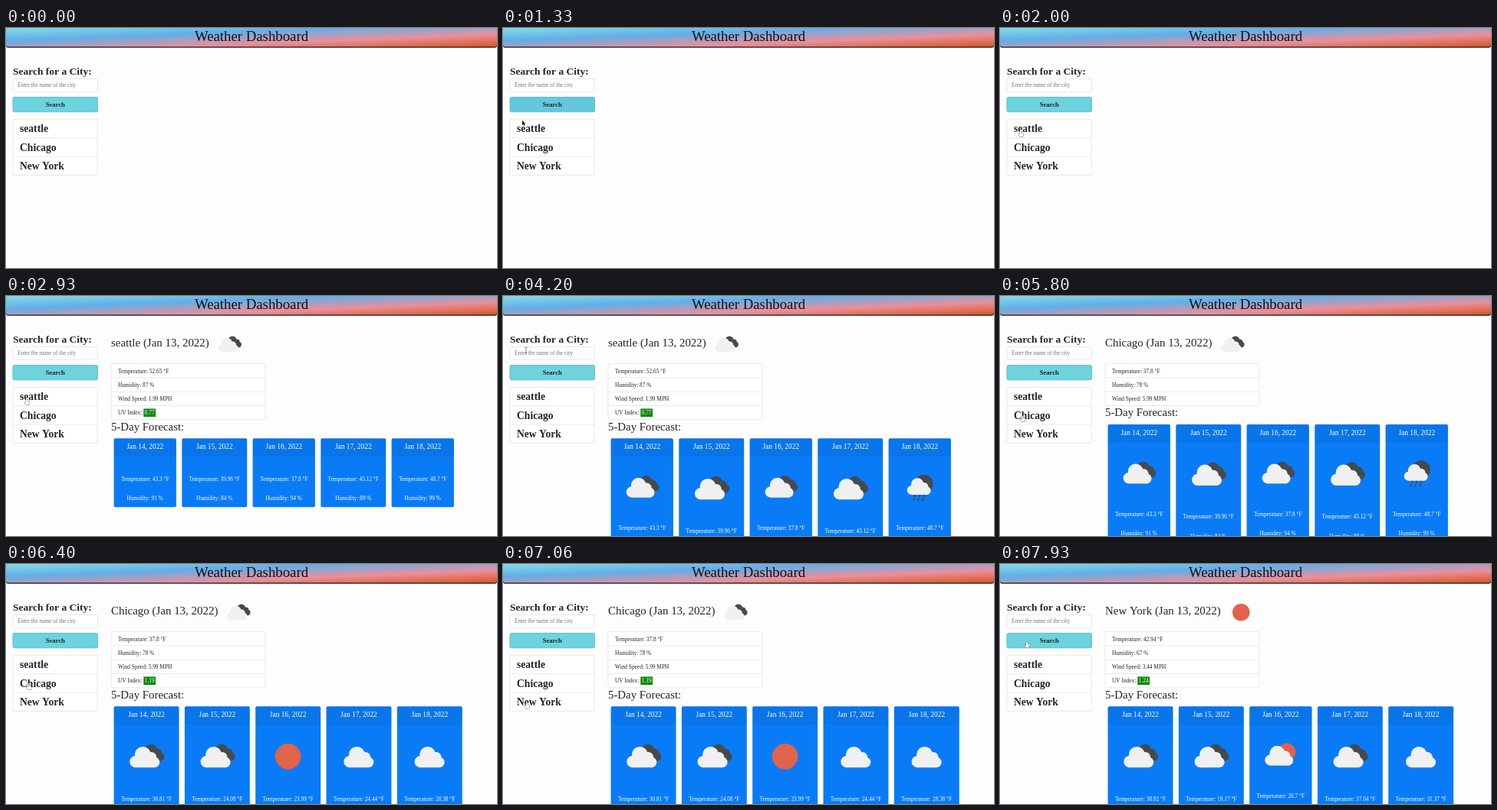
Write an HTML page with a canvas that moves like this. It is 640x314 px and loops after 8000 ms.

```html
<!DOCTYPE html>
<html lang="en">
<head>
<meta charset="utf-8">
<title>Weather Dashboard</title>
<style>
  html, body { margin: 0; width: 100%; height: 100%; overflow: hidden; background: #fdfdfd; }
  canvas { display: block; }
</style>
</head>
<body>
<canvas id="stage" width="640" height="314"></canvas>
<script>
const ctx = document.getElementById('stage').getContext('2d');
const LOOP = 8000, INK = '#212529', LINE = '#e4e4e4';

// info, uv, cards and icons are the times at which each part arrives
const cities = [
  { name: 'seattle', info: 2730, uv: 2800, cards: 2930, icons: 3000, icon: 'clouds',
    now: ['52.65', '87', '1.99', '0.77'], temps: ['43.3', '39.96', '37.8', '45.12', '48.7'],
    humidity: [91, 84, 94, 89, 99], sky: ['clouds', 'clouds', 'clouds', 'clouds', 'rain'] },
  { name: 'Chicago', info: 5800, uv: 5860, cards: 5860, icons: 5930, icon: 'clouds',
    now: ['37.8', '78', '5.99', '1.19'], temps: ['30.81', '24.08', '23.99', '24.44', '28.38'],
    humidity: [88, 81, 62, 75, 80], sky: ['clouds', 'clouds', 'sun', 'cloud', 'cloud'] },
  { name: 'New York', info: 7400, uv: 7460, cards: 7460, icons: 7530, icon: 'sun',
    now: ['42.94', '67', '3.44', '1.24'], temps: ['38.82', '19.17', '20.7', '37.04', '31.37'],
    humidity: [72, 45, 41, 78, 60], sky: ['clouds', 'clouds', 'sunCloud', 'clouds', 'cloud'] },
];

// pointer stops: time, x, y
const stops = [
  [460, -8, 140], [860, 22, 112], [1000, 22, 112], [1330, 25, 121], [1600, 27, 134.5],
  [3530, 27, 134.5], [4060, 30, 71], [4200, 30, 71], [5000, 29.5, 156.5], [6400, 29.5, 156.5],
  [6860, 31, 181], [7400, 31, 181], [7930, 35, 101.5],
];
const arrow = new Path2D('M0 0V6.2L1.5 4.9L2.5 7L3.6 6.5L2.7 4.5H4.5Z');
const hand = new Path2D('M-.9 4.5V.7Q0-.5.9.7V2.9L3.2 3.6Q3.7 4.5 3.4 5.8L2.6 8H-.9L-2.8 5.1Q-2.7 4.1-1.9 4.4Z');
const beam = new Path2D('M-1.5-4Q0-4 0-3Q0-4 1.5-4M0-3V3M-1.5 4Q0 4 0 3Q0 4 1.5 4');

const clamp = v => Math.min(1, Math.max(0, v));
const mix = (a, b, k) => a + (b - a) * k;
const latest = (part, t) => cities.findLast(c => t >= c[part]);

function text(str, x, y, size, { color = INK, weight = 'normal', align = 'left' } = {}) {
  ctx.font = `${weight} ${size}px "Liberation Serif", serif`;
  ctx.textAlign = align;
  ctx.fillStyle = color;
  ctx.fillText(str, x, y);
}

function box(x, y, w, h, fill, stroke, radius = 2) {
  ctx.beginPath();
  ctx.roundRect(x, y, w, h, radius);
  if (fill) { ctx.fillStyle = fill; ctx.fill(); }
  if (stroke) { ctx.strokeStyle = stroke; ctx.lineWidth = 0.8; ctx.stroke(); }
}

function rule(x, y, w, color = LINE) {
  ctx.fillStyle = color;
  ctx.fillRect(x, y - 0.4, w, 0.8);
}

function disc(x, y, r, color) {
  ctx.beginPath();
  ctx.arc(x, y, r, 0, 7);
  ctx.fillStyle = color;
  ctx.fill();
}

function cloud(x, y, scale, color) {
  ctx.save();
  ctx.translate(x, y);
  ctx.scale(scale, scale);
  disc(-11.5, 6, 7.2, color);
  disc(-2.5, -2.8, 10, color);
  disc(8, 0.5, 6.5, color);
  disc(11.8, 6.6, 6.6, color);
  ctx.fillRect(-11.5, 2, 23.3, 11.2);
  ctx.restore();
}

function rainDrops() {
  ctx.strokeStyle = DARK;
  ctx.lineWidth = 2;
  ctx.lineCap = 'round';
  ctx.beginPath();
  for (let i = 0; i < 6; i++) {
    const x = -6 + (i % 3) * 6 - (i > 2) * 1.5, y = 11 + (i > 2) * 4.5;
    ctx.moveTo(x, y);
    ctx.lineTo(x - 0.7, y + 1.4);
  }
  ctx.stroke();
}

const PALE = '#f0f0f0', DARK = '#48494b', SUN = '#e2634c';
const skies = {
  clouds() { cloud(7.5, -5, 0.8, DARK); cloud(-2, 0.5, 1, PALE); },
  cloud() { cloud(0, 0.5, 1, PALE); },
  sun() { disc(0, 0, 16, SUN); },
  sunCloud() { disc(8, -4, 11.5, SUN); cloud(-2, 0.5, 1, PALE); },
  rain() { disc(5.5, -4.5, 12, DARK); cloud(-1, -1, 0.84, PALE); rainDrops(); },
};

function drawIcon(kind, x, y, size) {
  ctx.save();
  ctx.translate(x, y);
  ctx.scale(size / 64, size / 64);
  skies[kind]();
  ctx.restore();
}

function drawHeader() {
  const sky = ctx.createLinearGradient(0, 0, 1.95, 49.9);
  ['#86dbe6', '#62aee8', '#ea8f9b', '#d9541e'].forEach((c, i) => sky.addColorStop(i / 3, c));
  box(0, 0, 640, 25.7, '#17131a', null, 3);
  box(0, 0, 640, 24.4, sky, null, 3);
  text('Weather Dashboard', 320, 17, 18.8, { color: '#111', align: 'center' });
}

function drawSidebar(t) {
  const bold = { weight: 'bold' };
  text('Search for a City:', 9, 60.5, 13.5, bold);
  box(9, 66.5, 110.5, 16.7, '#fff', '#dfe2e6');
  text('Enter the name of the city', 15, 77, 7.35, { color: '#6c757d' });
  const dim = t < 60 ? 0 : 1 - clamp((t - 1860) / 140);
  box(9, 90.5, 110.5, 19.3, `rgb(${mix(109, 100, dim)},${mix(211, 200, dim)},${mix(221, 218, dim)})`, '#52b2d4');
  text('Search', 64.3, 103, 8.6, { weight: 'bold', align: 'center' });
  box(9, 119.4, 110.2, 73, '#fff', LINE, 1);
  cities.forEach((c, i) => {
    if (i) rule(9, 119.4 + i * 24.4, 110);
    text(c.name, 18, 136 + i * 24.5, 13.6, bold);
  });
}

function drawCurrent(city, showUv) {
  const title = `${city.name} (Jan 13, 2022)`;
  text(title, 137, 66, 14.95);
  drawIcon(city.icon, 137 + ctx.measureText(title).width + 26.5, 63.3, 45);
  const [temp, humidity, wind, uv] = city.now;
  const rows = [`Temperature: ${temp} °F`, `Humidity: ${humidity} %`, `Wind Speed: ${wind} MPH`];
  if (showUv) rows.push('UV Index:');
  box(137, 88.6, 201, rows.length * 18.3, '#fff', LINE);
  rows.forEach((row, i) => {
    if (i) rule(137, 88.6 + i * 18.3, 201);
    text(row, 146, 100.5 + i * 18.2, 7.35);
  });
  if (showUv) {
    box(179.3, 147.4, 15.8, 10.8, '#0c8a0c', null, 0);
    text(uv, 187.2, 155.2, 7.35, { color: '#fff', align: 'center' });
  }
}

function drawForecast(city, top, showIcons) {
  const white = { color: '#fff', align: 'center' };
  text('5-Day Forecast:', 137, top - 10.5, 14.85);
  let x = 140.4;
  city.temps.forEach((temp, i) => {
    const w = temp.length > 4 ? 85.3 : 81.7, mid = x + w / 2;
    const size = w - 18, shift = showIcons ? size + 0.5 : 0;
    box(x + 0.2, top, w - 0.4, 90 + shift, '#0a7bf7');
    box(x + 0.2, top, w - 0.4, 23, 'rgba(0,0,0,.05)', null, [2, 2, 0, 0]);
    rule(x, top + 23, w, 'rgba(0,0,0,.1)');
    text(`Jan ${14 + i}, 2022`, mid, top + 14.2, 9.4, white);
    if (showIcons) drawIcon(city.sky[i], mid, top + 32 + size / 2, size);
    text(`Temperature: ${temp} °F`, mid, top + 55.6 + shift, 7.35, white);
    text(`Humidity: ${city.humidity[i]} %`, mid, top + 80.8 + shift, 7.35, white);
    x += w + 7;
  });
}

function drawPointer(t) {
  if (t < stops[0][0]) return;
  const next = stops.findIndex(s => s[0] > t);
  const b = stops.at(next), a = next > 0 ? stops[next - 1] : b;
  const k = clamp((t - a[0]) / (b[0] - a[0] || 1)), ease = k * k * (3 - 2 * k);
  const x = mix(a[1], b[1], ease), y = mix(a[2], b[2], ease);
  ctx.save();
  ctx.translate(x, y);
  ctx.lineWidth = 0.7;
  if (x > 9 && y > 66 && y < 83) {
    ctx.strokeStyle = '#555';
    ctx.stroke(beam);
  } else {
    const link = x > 9 && (y > 123 || (y > 90 && y < 110));
    ctx.fillStyle = link ? '#fff' : '#111';
    ctx.strokeStyle = link ? '#222' : '#fff';
    ctx.stroke(link ? hand : arrow);
    ctx.fill(link ? hand : arrow);
  }
  ctx.restore();
}

function frame() {
  const t = performance.now() % LOOP;
  ctx.fillStyle = '#fdfdfd';
  ctx.fillRect(0, 0, 640, 314);
  drawHeader();
  drawSidebar(t);
  const current = latest('info', t), forecast = latest('cards', t);
  const showUv = current && t >= current.uv;
  if (current) drawCurrent(current, showUv);
  if (forecast) drawForecast(forecast, showUv ? 186.2 : 167.9, t >= forecast.icons);
  drawPointer(t);
  requestAnimationFrame(frame);
}
frame();
</script>
</body>
</html>
```
